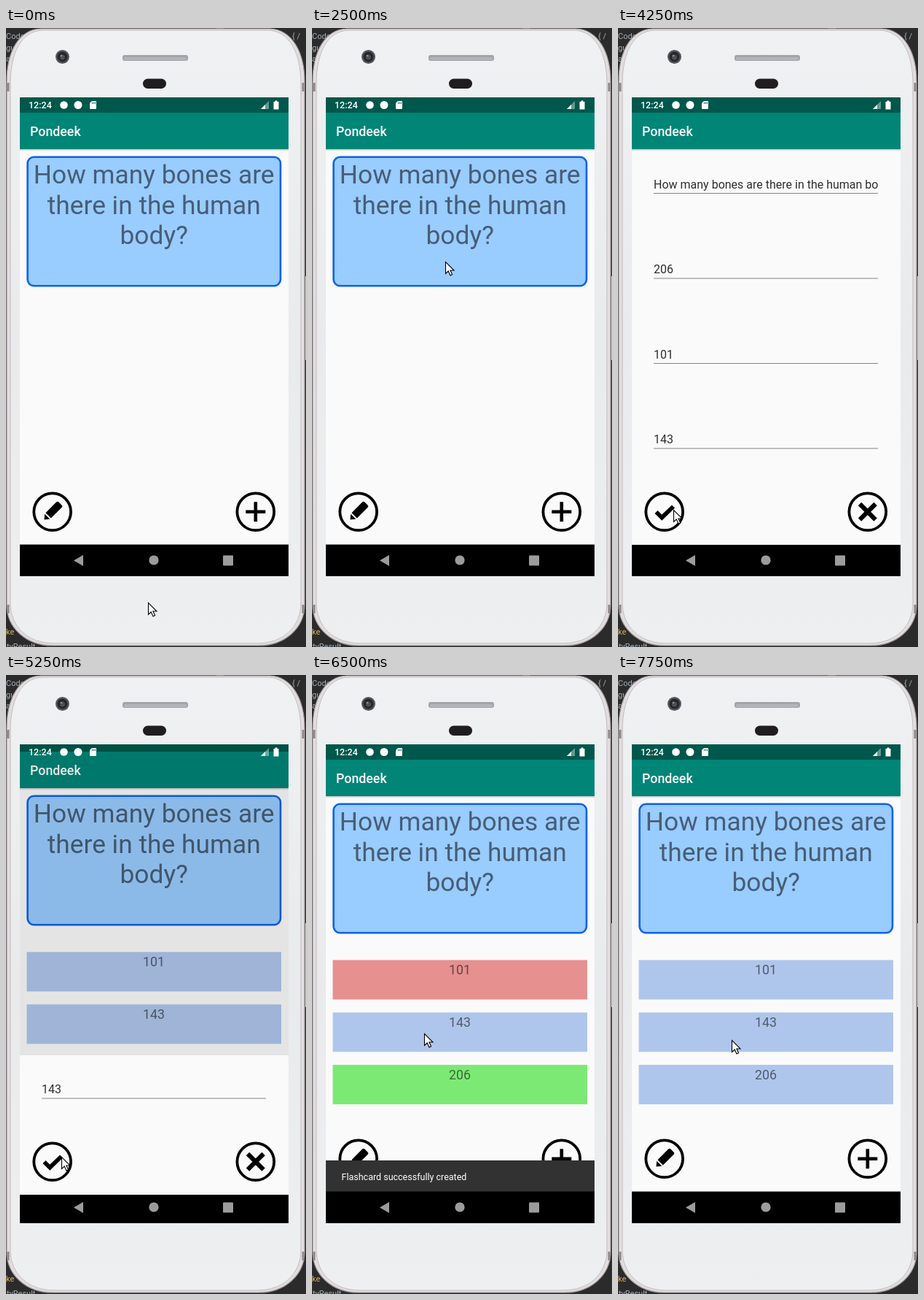
Animation of 412 by 848 pixels, one loop 8 s. Source, as an HTML page:

```html
<!DOCTYPE html>
<html lang="en">
<head>
<meta charset="utf-8">
<title>Flashcard app</title>
<style>
  html, body { margin: 0; width: 100%; height: 100%; overflow: hidden; background: #2b2b2b; }
  svg { display: block; width: 412px; height: 848px; }
  text { font-family: Roboto, Arial, sans-serif; white-space: pre; }
  .code { font: 11px "Noto Sans Mono", "DejaVu Sans Mono", monospace; fill: #a3afba; }
  .title { font-size: 17.8px; font-weight: 500; fill: #fff; }
  .card { font-size: 35.35px; fill: #000; fill-opacity: .54; text-anchor: middle; }
  .option { font-size: 17.8px; fill: #000; fill-opacity: .54; text-anchor: middle; }
  .field { font-size: 16px; fill: #000; fill-opacity: .82; }
  .icon { fill: none; stroke: #000; }
</style>
</head>
<body>
<svg viewBox="0 0 412 848" xmlns="http://www.w3.org/2000/svg">
  <defs>
    <linearGradient id="shell" x2="0" y2="1">
      <stop offset="0" stop-color="#eff1f2"/>
      <stop offset=".5" stop-color="#e9eaec"/>
      <stop offset="1" stop-color="#eeeff0"/>
    </linearGradient>
    <linearGradient id="shade" x2="0" y2="1">
      <stop offset="0" stop-color="#000" stop-opacity=".2"/>
      <stop offset="1" stop-color="#000" stop-opacity="0"/>
    </linearGradient>
    <clipPath id="screen"><rect x="19" y="95" width="369" height="656"/></clipPath>
    <clipPath id="window"><rect x="19" y="95" width="369" height="613"/></clipPath>
    <clipPath id="reveal"><rect id="revealBox" x="19" width="369"/></clipPath>
    <clipPath id="line"><rect x="49" y="195" width="308" height="34"/></clipPath>
    <g id="bars">
      <rect x="19" y="95" width="369" height="21" fill="#00574b"/>
      <rect x="19" y="116" width="369" height="50" fill="#008577"/>
      <rect x="19" y="166" width="369" height="3" fill="url(#shade)"/>
      <text class="title" x="33" y="148">Pondeek</text>
    </g>
    <circle id="ring" class="icon" r="25.4" stroke-width="3.8"/>
  </defs>

  <!-- editor behind the phone -->
  <rect width="412" height="848" fill="#2b2b2b"/>
  <g class="code">
    <text x="0" y="15">Code</text>
    <text x="0" y="31">gu</text>
    <text x="0" y="46">a</text>
    <text x="393" y="15">{ /</text>
    <text x="0" y="831" fill="#d8b45c">ke</text>
    <text x="-7" y="851">vityResult</text>
  </g>

  <!-- phone -->
  <rect x="289" y="0" width="10" height="5" fill="#77696d"/>
  <path d="M48 1H362C392 2 410 32 410 74V790C410 822 383 846 347 846H64C28 846 1 822 1 790V74C1 32 18 2 48 1Z"
        fill="#e2dedf" stroke="#aaa2a4" stroke-width="1.200"/>
  <path d="M50 3H360C389 4 405 34 405 76V788C405 820 381 843 345 843H66C30 843 6 820 6 788V76C6 34 21 4 50 3Z"
        fill="url(#shell)" stroke="#c3bbbd"/>
  <path d="M0 76V86M3 75V87M408 75V87M3 790V802M408 790V802" stroke="#8f8889" stroke-width="3"/>
  <path d="M411.5 340V455" stroke="#c9c9c9"/>
  <circle cx="77.500" cy="39.500" r="9.500" fill="#55565a"/>
  <circle cx="77.500" cy="39.500" r="7" fill="#26272b"/>
  <circle cx="77.500" cy="40" r="3.500" fill="#4d5058"/>
  <circle cx="76" cy="38" r="1.300" fill="#8b919b"/>
  <rect x="160" y="37" width="90" height="8" rx="3" fill="#a3a4a9"/>
  <rect x="162" y="40" width="86" height="4" rx="2" fill="#b4b5ba"/>
  <rect x="188" y="69.500" width="32" height="13.500" rx="6.700" fill="#1f1d20"/>

  <!-- screen -->
  <g clip-path="url(#screen)">
    <rect x="19" y="95" width="369" height="656" fill="#fafafa"/>
    <g clip-path="url(#window)">
      <g id="main">
        <use href="#bars"/>
        <rect id="card"/>
        <g id="question">
          <text class="card" x="203.200" y="213">How many bones are</text>
          <text class="card" x="203.200" y="254.500">there in the human</text>
          <text class="card" x="203.200" y="296">body?</text>
        </g>
        <text id="answer" class="card" x="203.200" y="213">206</text>
        <g id="options"></g>
        <use href="#ring" x="63.700" y="662.800"/>
        <path transform="translate(64.500 661.500) rotate(-45)"
              d="M-17 0L-11 -5V5ZM-9 -5.200H12Q14 -5.200 14 -3.200V3.200Q14 5.200 12 5.200H-9Z"/>
        <use href="#ring" x="342.800" y="662.800"/>
        <path class="icon" d="M329.300 662.800H356.300M342.800 649.300V676.300" stroke-width="4.600"/>
      </g>
      <rect id="dim" x="19" y="95" width="369" height="613"/>
      <g id="snack">
        <rect x="19" y="665" width="369" height="44" fill="#323232"/>
        <text x="40.500" y="691.500" font-size="12.500" fill="#fff">Flashcard successfully created</text>
      </g>
    </g>

    <rect x="19" y="707.600" width="369" height="44" fill="#000"/>
    <g fill="#9c9c9c">
      <path d="M93 729.500L106 722V737Z"/>
      <circle cx="203" cy="729" r="6.600"/>
      <rect x="298" y="722.500" width="14" height="14" rx="1"/>
    </g>

    <g clip-path="url(#reveal)">
      <g id="edit">
        <rect x="19" y="95" width="369" height="613" fill="#fafafa"/>
        <use href="#bars"/>
        <g id="fields"></g>
        <use href="#ring" x="63.700" y="662.800"/>
        <path class="icon" d="M52.500 663L60.300 670.700L76 655.500" stroke-width="5.800"/>
        <use href="#ring" x="342.800" y="662.800"/>
        <path class="icon" d="M332 652L353.600 673.600M353.600 652L332 673.600" stroke-width="6.200"/>
      </g>
    </g>

    <!-- status bar -->
    <g fill="#fff">
      <text x="31" y="110.300" font-size="12.500" font-weight="500">12:24</text>
      <circle cx="79.500" cy="105.500" r="5.300"/>
      <circle cx="99" cy="105.500" r="5.500"/>
      <path d="M118 100H123Q124 100 124 101V110Q124 111 123 111H116Q115 111 115 110V103Z"/>
      <path d="M118.500 101.500V104M120.500 101.500V104M122.500 101.500V104" stroke="#00574b" stroke-width=".9"/>
      <path d="M361 100V111H350Z" fill-opacity=".4"/>
      <path d="M356 105V111H350Z"/>
      <path d="M369.500 99.500H372.500V101H374.500V111.500H367.500V101H369.500Z"/>
    </g>
  </g>
  <path id="cursor" d="M.5 .5V16.500L4.200 13L7 19L9.600 17.800L6.900 12H12Z" fill="#fff" stroke="#000" stroke-width="1.100"/>
</svg>

<script>
const LOOP = 8000;
const BLUE = '#afc6ec', RED = '#e69090', GREEN = '#7ce975';
const byId = id => document.getElementById(id);

const add = (parent, tag, attrs, text) => {
  const el = document.createElementNS('http://www.w3.org/2000/svg', tag);
  set(el, attrs);
  if (text) el.textContent = text;
  parent.appendChild(el);
  return el;
};
function set(el, attrs) {
  for (const key in attrs) el.setAttribute(key, attrs[key]);
}
const show = (id, on) => set(byId(id), { display: on ? 'inline' : 'none' });
const move = (id, x, y) => set(byId(id), { transform: `translate(${x} ${y})` });

const choices = ['101', '143', '206'].map((label, i) => {
  const y = 390.5 + i * 71.8;
  const box = add(byId('options'), 'rect', { x: 28.5, y, width: 349.5, height: 54 });
  add(byId('options'), 'text', { class: 'option', x: 203, y: y + 19.5 }, label);
  return box;
});

['How many bones are there in the human body?', '206', '101', '143'].forEach((label, i) => {
  const y = 226.5 + i * 116.5;
  const attrs = { class: 'field', x: 49, y: y - 7 };
  if (i === 0) attrs['clip-path'] = 'url(#line)';
  add(byId('fields'), 'text', attrs, label);
  add(byId('fields'), 'rect', { x: 49, y: y - 0.5, width: 308, height: 1, fill: '#858585' });
});

// Each track lists [start time, value]; values hold until the next entry.
const tracks = {
  cursor: [
    [0, [195, 787]], [250, [210, 360]], [500, [183, 320]], [2750, [167, 384]],
    [3000, [107, 664]], [3250, [76, 660]], [6000, [165, 415]], [6500, [154, 491]],
    [6750, [160, 676]], [7250, [160, 500]], [7750, [156, 500]]
  ],
  flipped: [[0, false], [1250, true], [2500, false]],
  lift: [[0, 0], [3750, 1.6], [4000, 9], [4250, 11], [5500, 1], [5750, 0]],
  dim: [[0, 0], [3750, .075], [4000, .09], [5500, 0]],
  // sheet: top of the revealed part and its vertical offset
  sheet: [[0, null], [3750, [342.5, 23]], [4000, [95, 4]], [4250, [95, 0]], [5250, [521, 4]], [5500, null]],
  options: [[0, false], [5250, true]],
  graded: [[0, false], [6500, true], [7250, false]],
  snack: [[0, 44], [5750, 0], [7000, 21], [7250, 44]]
};
const at = (name, t) => tracks[name].filter(([start]) => start <= t).pop()[1];

function draw(t) {
  const flipped = at('flipped', t);
  const stroke = flipped ? 5 : 2.6;
  set(byId('card'), {
    x: 28.3 + stroke / 2, y: 175.5 + stroke / 2,
    width: 350 - stroke, height: 179 - stroke, rx: 10 - stroke / 2,
    fill: flipped ? '#ccffcc' : '#99ccff',
    stroke: flipped ? '#30a84f' : '#0a62ea', 'stroke-width': stroke
  });
  show('question', !flipped);
  show('answer', flipped);

  show('options', at('options', t));
  const colours = at('graded', t) ? [RED, BLUE, GREEN] : [BLUE, BLUE, BLUE];
  choices.forEach((box, i) => set(box, { fill: colours[i] }));

  move('main', 0, -at('lift', t));
  set(byId('dim'), { 'fill-opacity': at('dim', t) });
  move('snack', 0, at('snack', t));

  const sheet = at('sheet', t);
  show('edit', sheet);
  if (sheet) {
    const [top, offset] = sheet;
    set(byId('revealBox'), { y: top, height: 708 + offset - top });
    move('edit', 0, offset);
  }
  move('cursor', ...at('cursor', t));
}

const begin = performance.now();
function tick() {
  draw((performance.now() - begin) % LOOP);
  requestAnimationFrame(tick);
}
tick();
</script>
</body>
</html>
```
